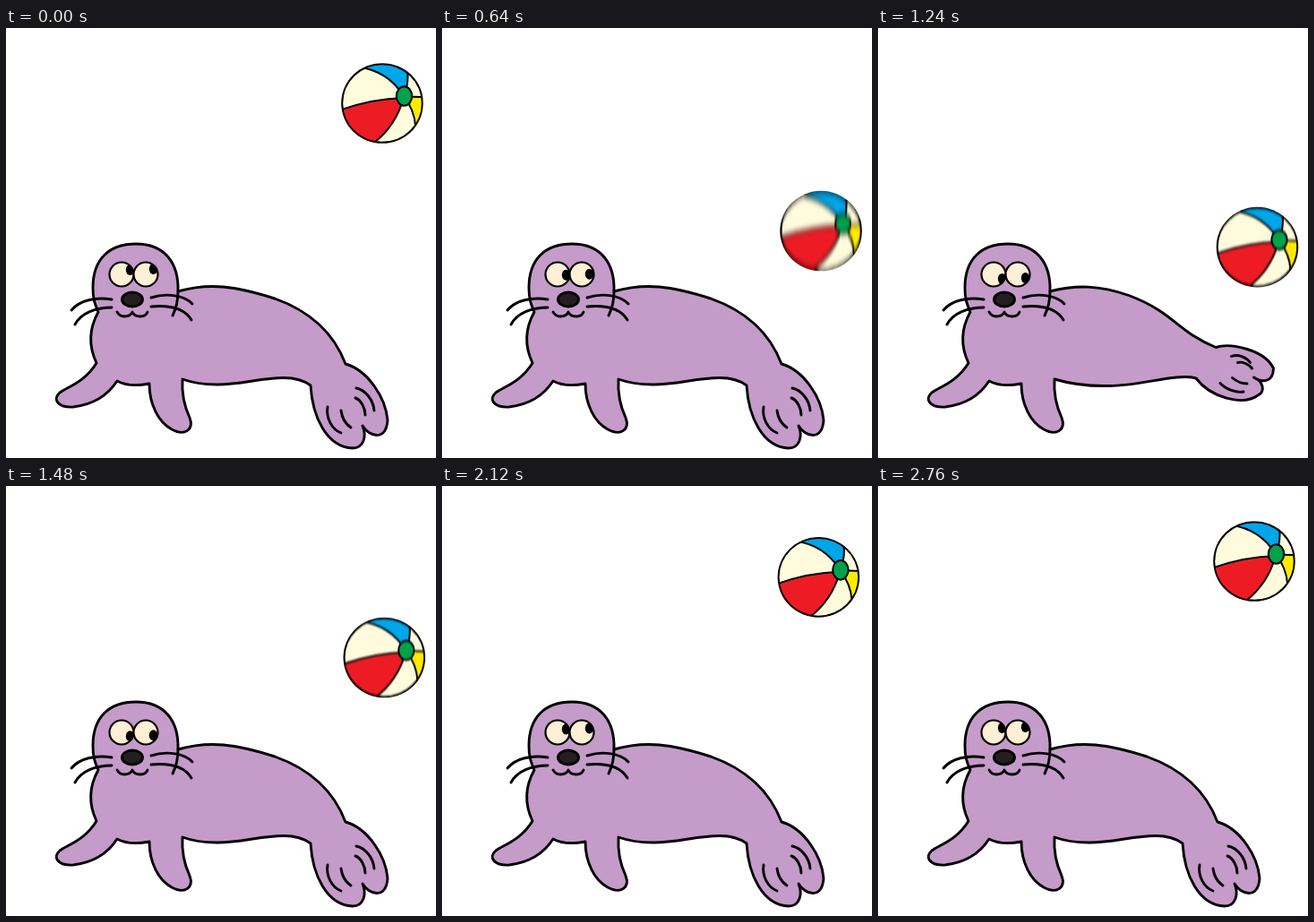
An HTML page that plays this animation: 480x480 px, repeating every 2.88 s.

```html
<!DOCTYPE html>
<html lang="en">
<head>
<meta charset="utf-8">
<title>Seal and beach ball</title>
<style>
html, body { margin: 0; width: 100%; height: 100%; overflow: hidden; background: #fff; }
svg { display: block; width: 100%; height: 100%; }
</style>
</head>
<body>
<svg viewBox="0 0 480 480" fill="none" stroke="#000" stroke-width="2.9" stroke-linecap="round" stroke-linejoin="round">
  <defs>
    <clipPath id="rim"><ellipse rx="45.8" ry="44.8"/></clipPath>
    <clipPath id="eyes"><circle cx="129" cy="275" r="13.5"/><circle cx="156" cy="275" r="13.5"/></clipPath>
    <filter id="blur" filterUnits="userSpaceOnUse" x="-70" y="-80" width="140" height="160" color-interpolation-filters="sRGB">
      <feGaussianBlur id="motion" stdDeviation="0 0"/>
      <feComponentTransfer><feFuncA type="linear" slope="4"/></feComponentTransfer>
    </filter>
  </defs>

  <path id="body" fill="#c49bc9"/>
  <path id="creases"/>
  <path d="M192 294C192 306 190 313 186 321"/>

  <g fill="#ffefd5" stroke-width="2.2">
    <circle cx="129" cy="275" r="13.5"/>
    <circle cx="156" cy="275" r="13.5"/>
  </g>
  <g clip-path="url(#eyes)">
    <g id="pupils" fill="#000" stroke="none">
      <ellipse cx="138.5" cy="270" rx="4.7" ry="6"/>
      <ellipse cx="164.5" cy="269" rx="4.7" ry="6"/>
    </g>
  </g>
  <ellipse cx="141" cy="303" rx="11.5" ry="8" fill="#231f20"/>
  <path d="M124 317Q127 322 132 322Q139 322 141 317Q143 322 150 322Q156 322 158 317
    M118 303C100 300 82 304 73 315M118 312C100 312 84 318 77 331
    M162 301C180 295 200 299 208 308M162 311C185 309 200 314 207 326"/>

  <g id="ball">
    <g clip-path="url(#rim)">
      <g filter="url(#blur)" stroke-width="2">
        <ellipse rx="44.8" ry="43.8" fill="#fffbdc" stroke="none"/>
        <g clip-path="url(#rim)">
          <path fill="#00a6e8" d="M-25 -40Q6 -36 24 -8Q30 -22 28 -37L28 -60H-25Z"/>
          <path fill="#ed1c24" d="M-48 8Q-12 -5 24 -6Q14 28 -12 46L-60 60Z"/>
          <path fill="#ffea00" d="M24 -8Q34 -7 50 -7V30L37 25Q36 8 24 -8Z"/>
        </g>
        <ellipse rx="44.8" ry="43.8"/>
        <ellipse cx="24.5" cy="-8" rx="8.7" ry="10.8" fill="#00a14b"/>
      </g>
    </g>
  </g>
</svg>
<script>
const LOOP = 2880, STEP = 40, LAST = 2760;
const el = id => document.getElementById(id);

// Head, chest and front flippers; the tail closes the outline.
const FRONT = `C196 408 198 420 205 435C210 448 200 456 185 448C170 440 160 420 160 397
  C150 399 135 400 124 394C115 408 100 420 75 423C57 424 52 414 60 407C70 400 88 395 101 374
  C92 355 93 335 103 317C99 308 97 302 97 290C97 258 115 241 145 241C177 241 193 262 192 294Z`;
const TAIL_DOWN = `M192 294C227 284 256 288 300 302C345 318 368 346 379 375C404 382 424 413 426 438
  C424 462 405 456 398 444C403 456 399 469 387 469C358 468 342 434 340 399
  C315 380 270 399 235 398C220 398 208 396 197 392`;
const TAIL_UP = `M192 294C215 289 238 286 260 295C316 317 300 332 375 338C384 320 440 306 457 322
  C458 332 450 335 441 336C458 333 465 342 463 350C455 378 400 390 370 383
  C350 390 320 400 280 401C250 402 220 398 197 392`;
const CREASES_DOWN = `M359 423C357 436 364 448 374 452M374 427C375 435 379 442 385 446
  M390 413C396 415 401 424 401 432M391 402C401 404 410 415 411 427`;
const CREASES_UP = `M405 370C420 371 436 367 442 360M417 354C427 355 435 352 439 348
  M413 334C418 329 427 327 434 328M398 331C403 323 412 320 420 320`;

function morph(from, to, k) {
  const target = to.match(/\d+/g);
  let i = 0;
  return from.replace(/\d+/g, n => (+n + (target[i++] - n) * k).toFixed(2));
}

function smooth(t, start, end) {
  const u = Math.min(1, Math.max(0, (t - start) / (end - start)));
  return u * u * (3 - 2 * u);
}

// Distance fallen: quick drop, short rest on the tail, slow rise.
function drop(t) {
  const speed = t < 905 ? 0.0208 * Math.max(0, t - 66) : 0.0096 * Math.max(0, 2560 - t);
  return Math.min(197, speed * speed);
}

function draw(t) {
  const tail = smooth(t, 640, 840) - smooth(t, 1080, 1400);
  el("body").setAttribute("d", morph(TAIL_DOWN, TAIL_UP, tail) + FRONT);
  el("creases").setAttribute("d", morph(CREASES_DOWN, CREASES_UP, tail));

  const gaze = smooth(t, 320, 900) - smooth(t, 1300, 2400);
  el("pupils").setAttribute("transform", `translate(0 ${10 * gaze})`);

  const fall = drop(t);
  const contact = Math.min(1, Math.max(0, (t - 750) / 310));
  const squash = 1 - 0.27 * Math.sin(Math.PI * contact);
  const x = 420 + 0.0217 * fall;
  const y = 128 + fall - 44 * squash;
  el("ball").setAttribute("transform", `translate(${x} ${y}) scale(1 ${squash})`);
  const velocity = Math.abs(drop(t + 20) - drop(t - 20)) / 40;
  el("motion").setAttribute("stdDeviation", `0 ${Math.max(0, 9 * velocity - 0.7)}`);
}

function tick() {
  const t = performance.now() % LOOP;
  draw(Math.min(LAST, Math.floor(t / STEP) * STEP));
  requestAnimationFrame(tick);
}
tick();
</script>
</body>
</html>
```
